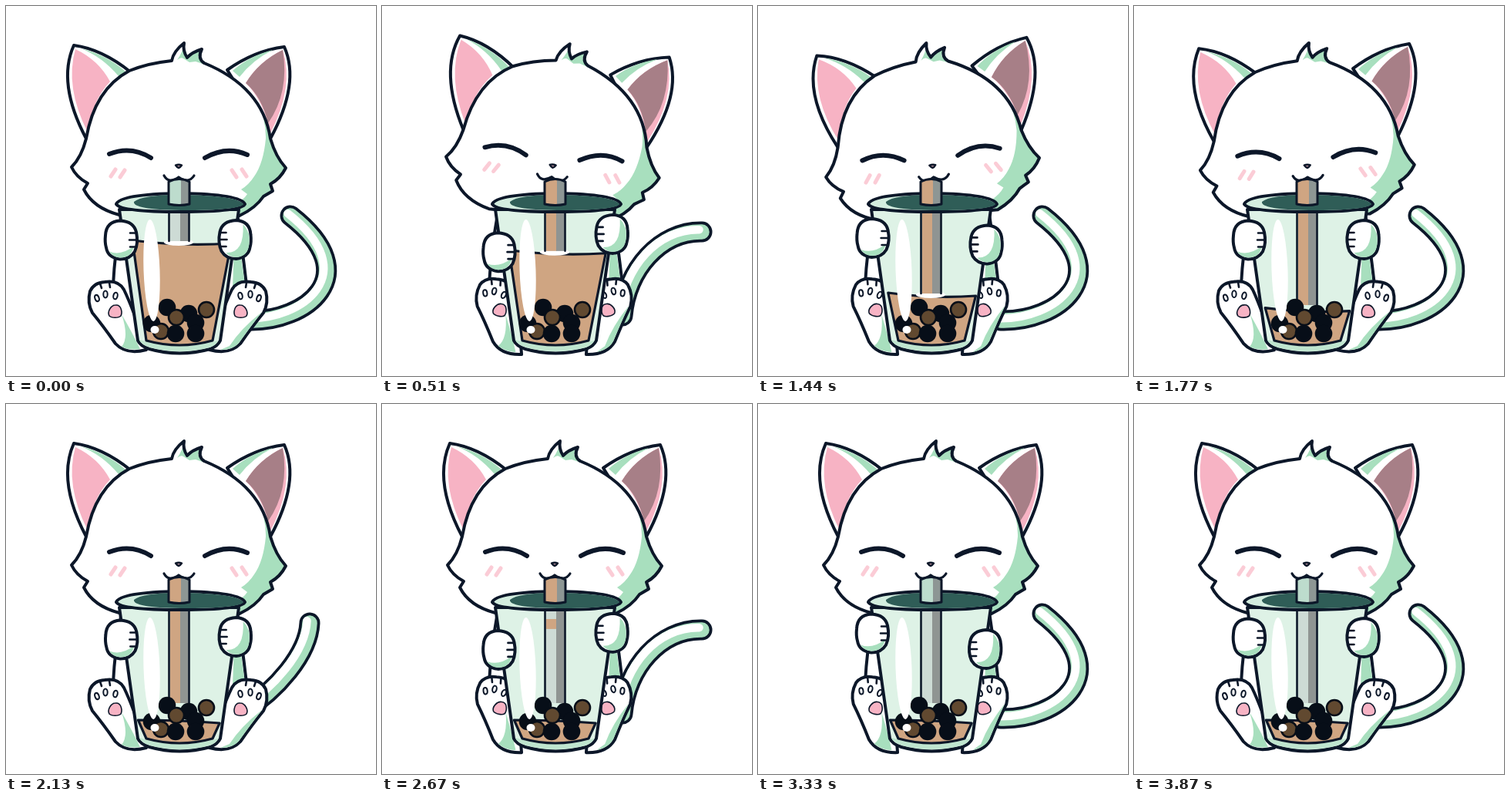
These frames come from a looping animation (480x480 px, 3960 ms). An HTML page:

```html
<!DOCTYPE html>
<html lang="en">
<head>
<meta charset="utf-8">
<title>Cat with bubble tea</title>
<style>
  html, body { margin: 0; width: 100%; height: 100%; overflow: hidden; background: #fff; }
  svg { display: block; width: 100vw; height: 100vh; }
  .line { stroke: #0c1729; stroke-width: 4; stroke-linejoin: round; stroke-linecap: round; }
  .thin { stroke: #0c1729; stroke-width: 2.6; stroke-linecap: round; fill: none; }
  .open { fill: none; }
  .white { fill: #fff; }
  .green { fill: #a8dfbe; }
  .pink { fill: #f7b3c4; }
  .tea { fill: #cfa582; }
  .tail path { fill: none; stroke-linecap: round; }
</style>
</head>
<body>
<svg viewBox="0 0 480 480">
  <defs>
    <path id="face" d="M104 172Q98 196 85 209Q91 222 106 230L101 238Q113 262 147 271L303 272Q324 262 334 247Q339 244 346 240L343 231Q356 224 363 210Q350 196 343 172Q333 105 257 74Q248 68 254 56Q241 60 235 67Q229 58 231 48Q217 59 215 71Q185 74 160 84Q115 108 104 172Z"/>
    <clipPath id="faceClip"><use href="#face"/></clipPath>
    <path id="footShape" d="M182 446Q156 453 142 438Q126 415 112 398Q105 385 109 370Q114 359 128 358Q146 355 153 368Q166 395 182 446Z"/>
    <g id="toes" transform="translate(1 -1)">
      <path class="thin" d="M121 361L123 367M133 360L134 366"/>
      <g class="white" stroke="#0c1729" stroke-width="2">
        <ellipse cx="117" cy="380" rx="2.6" ry="4.2" transform="rotate(-20 117 380)"/>
        <ellipse cx="128" cy="375" rx="2.7" ry="4.4"/>
        <ellipse cx="141" cy="377" rx="2.7" ry="4.4" transform="rotate(12 141 377)"/>
      </g>
      <path d="M141 389C149 388 150 399 148 403C145 406 136 406 133 403C130 398 135 389 141 389Z" class="pink" stroke="#0c1729" stroke-width="1.6"/>
    </g>
    <path id="handShape" d="M-20 -6Q-19 -24 -1 -25Q17 -24 20 -10Q23 4 18 15Q12 25 -1 25Q-17 23 -19 10Q-21 3 -20 -6Z"/>
    <path id="knuckles" class="thin" d="M12 -9H20M11 0H21M12 9H20"/>
  </defs>

  <g class="tail">
    <path stroke="#0c1729" stroke-width="27"/>
    <path stroke="#a8dfbe" stroke-width="19.5"/>
    <path stroke="#fff" stroke-width="10.5" transform="translate(-3.5 -2.8)"/>
  </g>

  <path class="line white" d="M150 270Q141 320 139 362L160 440H290L312 362Q306 310 300 270Z"/>
  <path class="green" d="M296 310L304 318L310 362L292 420Z"/>

  <g id="head">
    <path class="line white" d="M104 172Q66 100 88 51Q125 56 162 86Z"/>
    <path class="green" d="M97 55Q130 63 155 85L146 91Q125 66 97 55Z"/>
    <path class="pink" d="M90 56Q120 70 135 98Q112 122 106 164Q76 105 90 56Z"/>
    <path class="line white" d="M343 172Q382 100 361 53Q322 58 287 83Z"/>
    <path class="green" d="M346 57Q315 65 294 84L303 92Q320 70 346 57Z"/>
    <path class="pink" d="M359 57Q328 72 311 100Q334 122 343 165Q374 105 359 57Z"/>
    <path fill="#a77f87" d="M359 57Q328 72 311 100Q332 118 340 152Q368 112 359 57Z"/>
    <use href="#face" class="white"/>
    <g clip-path="url(#faceClip)" class="green">
      <path d="M290 84Q338 122 337 172Q334 204 322 221Q315 232 305 238L313 244Q308 252 294 260L300 274H375V160L340 90Z"/>
      <path d="M232 48L235 67L254 56L249 66L258 76L246 72L238 73L230 68Q227 66 222 70Q229 60 232 48Z"/>
    </g>
    <use href="#face" class="line open"/>
    <g class="line open">
      <path style="stroke-width:6" d="M134 192Q162 181 188 197M258 197Q286 181 313 193"/>
      <path style="stroke-width:3.2" d="M205 220Q211 231 224 222Q237 231 244 220"/>
    </g>
    <path d="M220 206.5Q224 205 228 206.5Q226 209.5 224 210Q222 209.5 220 206.5Z" fill="#c79aa5" stroke="#0c1729" stroke-width="2.4" stroke-linejoin="round"/>
    <path d="M136 221L142 212M148 222L154 213M293 213L299 222M306 212L312 221" stroke="#fbccd6" stroke-width="5" stroke-linecap="round"/>
  </g>

  <g id="footL">
    <use href="#footShape" class="line white"/>
    <path class="green" d="M150 400Q164 424 174 445Q160 447 150 442Q160 430 150 400Z"/>
    <use href="#toes"/>
  </g>
  <g id="footR">
    <use href="#footShape" class="line white"/>
    <path class="green" d="M114 397Q128 415 143 436Q150 446 168 446L156 441Q141 418 114 397Z"/>
    <use href="#toes"/>
  </g>

  <g id="cup">
    <path class="line" fill="#def2e6" d="M147 264L171 434Q174 441 186 445Q225 456 265 445Q275 441 278 434L302 264Z"/>
    <path fill="#bfe5cf" d="M173 433Q225 449 275 434Q273 440 264 443Q225 453 187 443Q175 439 173 433Z"/>
    <path id="tea" class="line tea" style="stroke-width:3.2"/>
    <ellipse id="ripple" class="white" cx="224" rx="19" ry="4.5"/>
    <g id="lowerStraw">
      <rect id="strawLight" x="211.5" y="262" width="26" fill="#cddbd5"/>
      <rect id="strawTea" class="tea" x="213" width="14"/>
      <rect id="strawDark" x="226" y="262" width="11" fill="#8f9492"/>
      <path id="strawEdges" class="thin" stroke-linecap="butt"/>
    </g>
    <g id="pearls"></g>
    <ellipse class="white" cx="189" cy="343" rx="10.5" ry="66" transform="rotate(-2 189 343)"/>
    <ellipse class="white" cx="193" cy="420" rx="5.5" ry="5"/>
    <path class="line" fill="#d3eddf" d="M143 257Q148 244 226 243Q304 244 310 257Q306 267 227 267Q148 267 143 257Z"/>
    <path fill="#2f5d57" d="M166 254Q176 245 228 245Q300 246 308 257Q303 265 227 265Q164 264 166 254Z"/>
  </g>

  <g id="upperStraw">
    <path fill="#bddccd" d="M211 228Q225 222 238 228V257Q225 260 211 257Z"/>
    <rect id="sipTea" class="tea" x="212" width="15"/>
    <path fill="#8d9694" d="M227 224L238 228V257L227 259Z"/>
    <path class="line open" style="stroke-width:3" d="M211 228Q225 221 238 228V257Q225 260 211 257Z"/>
  </g>

  <g id="handL">
    <use href="#handShape" class="line white"/>
    <path class="green" d="M-15 15Q0 21 17 8Q14 23 -1 23Q-11 22 -15 15Z"/>
    <use href="#knuckles"/>
  </g>
  <g id="handR">
    <use href="#handShape" class="line white" transform="scale(-1 1)"/>
    <path class="green" d="M10 -20Q20 -10 18 6Q16 23 0 23Q-8 22 -12 17Q12 18 10 -20Z"/>
    <use href="#knuckles" transform="scale(-1 1)"/>
  </g>
</svg>
<script>
const LOOP = 3960, STEP = 30, CYCLE = 2000;
const $ = id => document.getElementById(id);
const tailPaths = document.querySelectorAll('.tail path');

const set = (id, attrs) => { for (const k in attrs) $(id).setAttribute(k, attrs[k]); };
const mix = (a, b, u) => a + (b - a) * u;
const ramp = (t, from, to) => Math.min(1, Math.max(0, (t - from) / (to - from)));
const smooth = u => u * u * (3 - 2 * u);

// the two neighbours of t in a list of [time, value] pairs, and the share between them
function between(t, keys) {
  let i = 1;
  while (i < keys.length - 1 && t > keys[i][0]) i++;
  const [[t0, a], [t1, b]] = [keys[i - 1], keys[i]];
  return [a, b, ramp(t, t0, t1)];
}

function eased(t, keys) {
  const [a, b, u] = between(t, keys);
  return mix(a, b, smooth(u));
}

// centre line of the tail: four Bezier points per pose
const CURL = [315, 408, 388, 410, 469, 350, 369, 272];
const UPRIGHT = [308, 398, 350, 372, 392, 325, 394, 284];
const OUT = [312, 402, 317, 342, 361, 292, 415, 293];
const REACH = [312, 404, 311, 348, 368, 292, 427, 297];
const TAIL = [[0, CURL], [130, UPRIGHT], [510, OUT], [590, REACH]];

// out and back along the same poses, then at rest
function tailPose(phase) {
  const [a, b, u] = between(Math.max(0, 590 - Math.abs(590 - phase)), TAIL);
  return a.map((v, k) => mix(v, b[k], u));
}

const PEARLS = [
  [209, 391, 0], [237, 399, 0], [221, 404, 1], [260, 394, 1], [189, 412, 0],
  [201, 422, 1], [246, 411, 0], [220, 425, 0], [246, 425, 0]
];
$('pearls').innerHTML = PEARLS.map(([x, y, brown]) =>
  `<circle cx="${x}" cy="${y}" r="${brown ? 10 : 11.3}" fill="${brown ? '#614930' : '#070e18'}"` +
  `${brown ? ' stroke="#070e18" stroke-width="2.6"' : ''}/>`).join('');

function drawTea(t) {
  const level = mix(304, 410, ramp(t, 295, 2080));
  const drop = level - 304;
  const left = 164 + drop * 0.07, right = 292 - drop * 0.14;
  const sag = 8 * (1 - ramp(level, 390, 410));
  $('tea').setAttribute('d',
    `M${left} ${level}Q226 ${level + sag} ${right} ${level + 4}L268 434Q225 446 182 434Z`);
  set('ripple', { cy: level + 2.5, opacity: level < 385 ? 1 : 0 });

  const end = Math.min(level + 1, 388);
  set('strawLight', { height: end - 262 });
  set('strawDark', { height: end - 262 });
  set('strawEdges', { d: `M211.5 262V${end}M237.5 262V${end}` });

  const fill = ramp(t, 30, 270), drain = ramp(t, 2180, 2700);
  const top = mix(end, 262, fill) + 18 * drain;
  const bottom = mix(end, 286, drain);
  set('strawTea', { y: top, height: drain < 1 ? Math.max(0, bottom - top) : 0 });

  const sipTop = mix(257, 226, ramp(t, 270, 390));
  const sipBottom = mix(257, 226, ramp(t, 2700, 2850));
  set('sipTea', { y: sipTop, height: Math.max(0, sipBottom - sipTop) });
}

function draw(t) {
  const phase = t % CYCLE;

  const tilt = eased(t, [[0, 0], [580, 5.7], [1360, -5.6], [2010, 0]]);
  set('head', { transform: `rotate(${tilt} 225 182)` });

  const p = tailPose(phase);
  const d = `M${p[0]} ${p[1]}C${p.slice(2).join(' ')}`;
  tailPaths.forEach(path => path.setAttribute('d', d));

  const turn = eased(phase, [[0, 0], [140, 0], [500, 13], [1000, 14], [1420, 13], [1830, 0], [2000, 0]]);
  const foot = `rotate(${turn} 155 445)`;
  set('footL', { transform: foot });
  set('footR', { transform: `translate(446 0) scale(-1 1) ${foot}` });

  const dl = eased(phase, [[0, 0], [590, 16.5], [1210, -8], [1580, 0], [2000, 0]]);
  const dr = eased(phase, [[0, 0], [590, -7.5], [1210, 20], [1580, 0], [2000, 0]]);
  set('handL', { transform: `translate(${149 + dl * 0.16} ${303.5 + dl})` });
  set('handR', { transform: `translate(${297.5 - dr * 0.16} ${303 + dr})` });

  drawTea(t);
}

const start = performance.now();
function tick() {
  const t = (performance.now() - start) % LOOP;
  draw(Math.floor(t / STEP) * STEP);
  requestAnimationFrame(tick);
}
draw(0);
requestAnimationFrame(tick);
</script>
</body>
</html>
```
